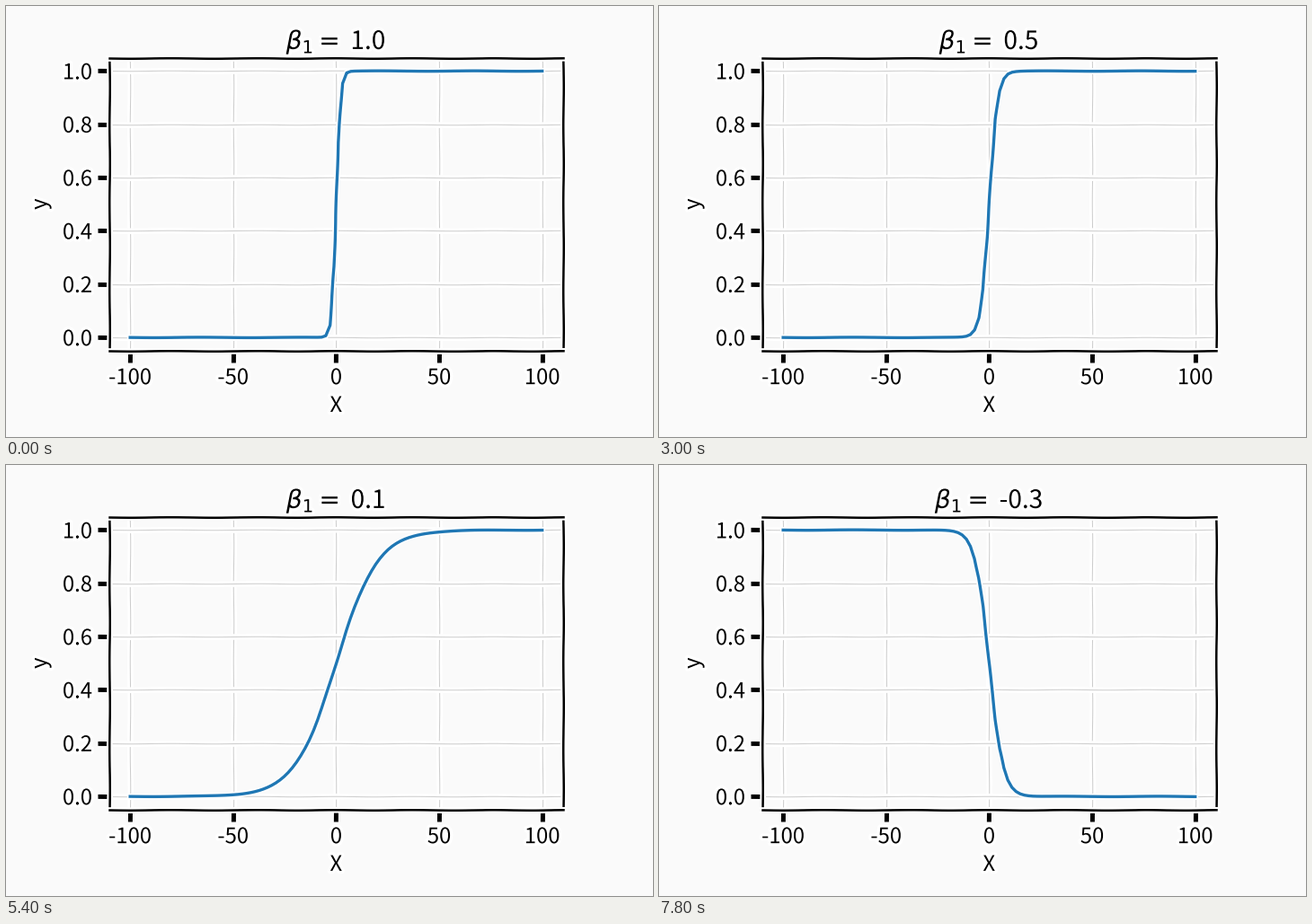
These frames come from a looping animation (720 px wide and 480 px high, 8000 ms). A matplotlib script:

```python
import numpy as np
import matplotlib.pyplot as plt
from matplotlib.animation import FuncAnimation

W, H, DPI = 720, 480, 120
PAPER = "#fafafa"
TEXT_SIZE, TITLE_SIZE = 14.3, 16.8

plt.xkcd(scale=.25)
plt.rcParams.update({
    "font.family": "Noto Sans CJK JP",
    "font.size": TEXT_SIZE,
    "mathtext.fontset": "dejavusans",
    "figure.facecolor": PAPER,
    "axes.facecolor": PAPER,
})

fig = plt.figure(figsize=(W / DPI, H / DPI), dpi=DPI)
ax = fig.add_axes([.16, .2, .7006, .68])
ax.set_xlim(-110, 110)
ax.set_ylim(-.05, 1.05)
ax.set_xticks(range(-100, 101, 50))
ax.set_yticks(np.linspace(0, 1, 6))
ax.grid(True, color="#cccccc", linewidth=.6)


def label(x, y, text, **style):
    """Centred text with its baseline at pixel (x, y), y pointing down."""
    return fig.text(x / W, 1 - y / H, text, ha="center", va="baseline",
                    rotation_mode="anchor", **style)


label(367.3, 452, "X")
label(45, 220.7, "y", rotation=90)
title = label(367.3, 48, "", fontsize=TITLE_SIZE)

xs = np.linspace(-100, 100, 100)
curve, = ax.plot(xs, np.zeros_like(xs), color="#1f77b4")


def update(i):
    beta = round(1 - .1 * (i // 3), 1)
    curve.set_ydata(1 / (1 + np.exp(-beta * xs)))
    title.set_text(rf"$\beta_1 = $ {beta:.1f}")
    return curve, title


anim = FuncAnimation(fig, update, frames=40, interval=200, repeat=True)
plt.show()
```
